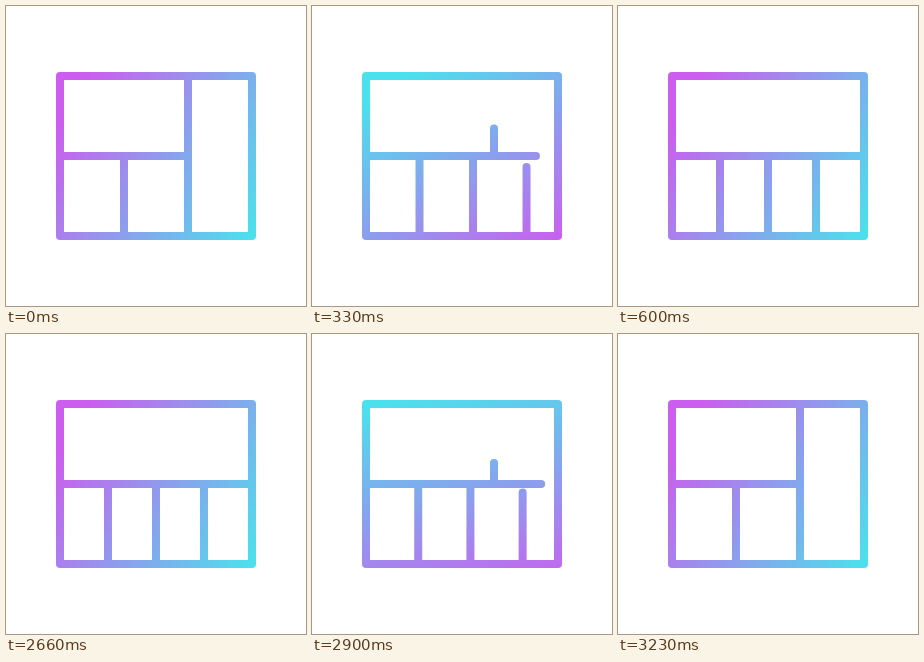
Recreate the animation shown at these times as an HTML page. Size 300 by 300 pixels, loop 4.26 s.

```html
<!DOCTYPE html>
<html lang="en">
<head>
<meta charset="utf-8">
<title>Layout switch</title>
<style>
  html, body { margin: 0; width: 100%; height: 100%; overflow: hidden; background: #fff; }
  svg { display: block; width: 100%; height: 100%; }
</style>
</head>
<body>
<svg viewBox="0 0 300 300">
  <defs>
    <linearGradient id="ink" gradientUnits="userSpaceOnUse">
      <stop offset="0" stop-color="#cb5eee"/>
      <stop offset="1" stop-color="#4be1ec"/>
    </linearGradient>
  </defs>
  <path id="grid" fill="none" stroke="url(#ink)" stroke-width="8"
        stroke-linecap="round" stroke-linejoin="round"/>
</svg>
<script>
const LOOP = 4260, STEP = 30, MOVE = 600, BACK = 2630;
const PIVOT = { x: 158, y: 162 }, RADIUS = 112, BASE_ANGLE = 31;

const grid = document.getElementById('grid');
const ink = document.getElementById('ink');

const clamp = v => Math.min(1, Math.max(0, v));
const mix = (a, b, k) => a + (b - a) * k;
const smooth = u => u * u * (3 - 2 * u);

// cubic-bezier(.7, 0, .3, 1)
function ease(u) {
  if (u <= 0 || u >= 1) return clamp(u);
  let lo = 0, hi = 1, s = 0.5;
  for (let i = 0; i < 30; i++) {
    s = (lo + hi) / 2;
    const r = 1 - s;
    const x = 3 * r * r * s * 0.7 + 3 * r * s * s * 0.3 + s * s * s;
    if (x < u) lo = s; else hi = s;
  }
  return smooth(s);
}

function layoutPath(k) {
  const column = (from, to, top) => `M${mix(from, to, k)} 230V${top}`;
  return [
    'M54 70H246V230H54Z',
    `M54 150H${mix(182, 246, k)}`,
    `M182 150V${mix(70, 149.99, k)}`,
    column(118, 102, 150),
    column(182, 150, 150),
    column(246, 198, mix(182, 150, k))
  ].join('');
}

function turnGradient(turn) {
  const a = (BASE_ANGLE + 360 * turn) * Math.PI / 180;
  const dx = RADIUS * Math.cos(a), dy = RADIUS * Math.sin(a);
  const ends = { x1: PIVOT.x - dx, y1: PIVOT.y - dy, x2: PIVOT.x + dx, y2: PIVOT.y + dy };
  for (const name in ends) ink.setAttribute(name, ends[name]);
}

function draw(ms) {
  const t = Math.floor((ms % LOOP) / STEP) * STEP;
  const u = t < BACK ? clamp(t / MOVE) : 1 - clamp((t - BACK) / MOVE);
  grid.setAttribute('d', layoutPath(ease(u)));
  turnGradient(smooth(u));
}

const start = performance.now();
function tick() {
  draw(performance.now() - start);
  requestAnimationFrame(tick);
}
tick();
</script>
</body>
</html>
```
